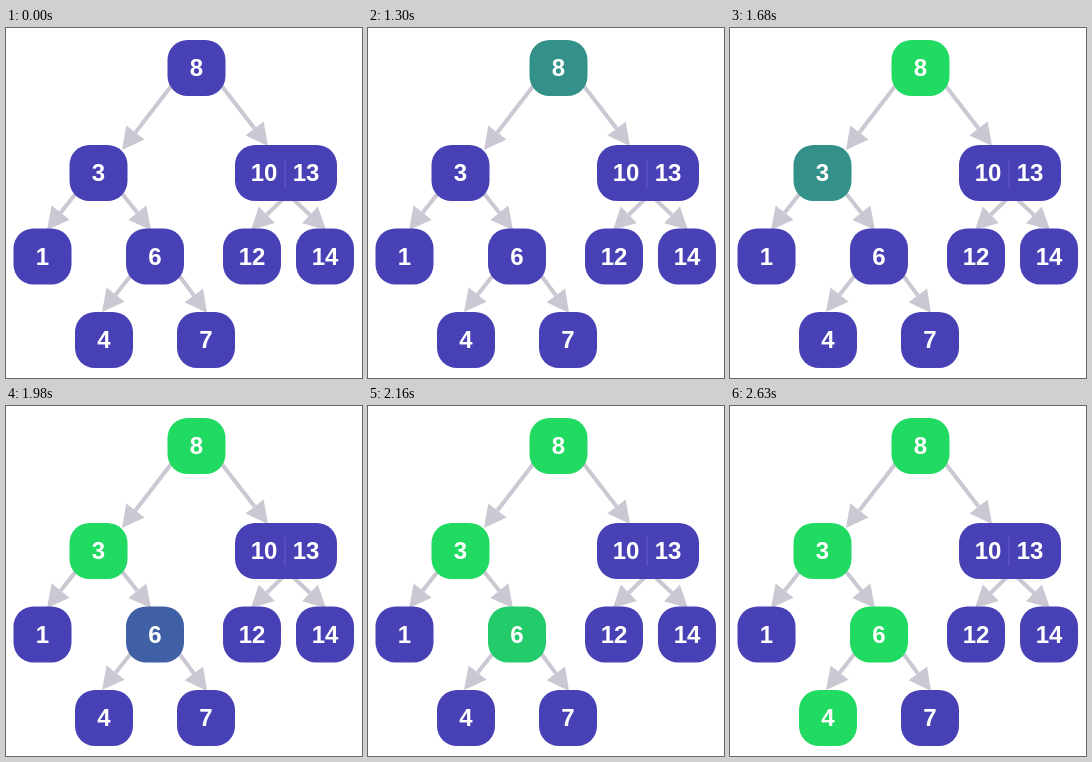
Write an HTML page with a canvas that moves like this. It is 356 px wide and 350 px high and loops after 5690 ms.

```html
<!DOCTYPE html>
<html lang="en">
<head>
<meta charset="utf-8">
<title>Tree search</title>
<style>
html, body { margin: 0; width: 100%; height: 100%; overflow: hidden; background: #fff; }
canvas { display: block; }
</style>
</head>
<body>
<canvas id="stage" width="356" height="350"></canvas>
<script>
const ctx = document.getElementById('stage').getContext('2d');
const LOOP = 5690, FIRST = 1120, STEP = 380, FADE = 350;
const IDLE = [72, 65, 182], FOUND = [32, 218, 98];

// step: place in the search path
const nodes = [
  { label: '8', x: 190.5, y: 40, step: 0 },
  { label: '3', x: 92.5, y: 145, step: 1 },
  { label: '1', x: 36.5, y: 228.5 },
  { label: '6', x: 149, y: 228.5, step: 2 },
  { label: '4', x: 98, y: 312, step: 3 },
  { label: '7', x: 200, y: 312 },
  { label: '12', x: 246, y: 228.5 },
  { label: '14', x: 319, y: 228.5 }
];

const arrows = [
  [166, 57, 116, 122], [215, 57, 262, 118],
  [71, 164, 41, 202], [114, 163, 145, 202],
  [126, 246, 96, 284], [172, 246, 201, 285],
  [277, 171, 245, 202], [287, 171, 320, 202]
];

function arrow([x1, y1, x2, y2]) {
  const len = Math.hypot(x2 - x1, y2 - y1);
  const ux = (x2 - x1) / len, uy = (y2 - y1) / len;
  const bx = x2 - ux * 22, by = y2 - uy * 22;
  ctx.beginPath();
  ctx.moveTo(x1, y1);
  ctx.lineTo(bx, by);
  ctx.stroke();
  ctx.beginPath();
  ctx.moveTo(x2, y2);
  ctx.lineTo(bx - uy * 11.5, by + ux * 11.5);
  ctx.lineTo(bx + uy * 11.5, by - ux * 11.5);
  ctx.fill();
}

function box(x, y, w, color) {
  ctx.fillStyle = color;
  ctx.beginPath();
  ctx.roundRect(x - w / 2, y - 28, w, 56, 20);
  ctx.fill();
}

function label(text, x, y) {
  ctx.fillStyle = '#fff';
  ctx.fillText(text, x, y + 8);
}

function nodeColor(step, t) {
  let p = 0;
  if (step !== undefined) {
    p = Math.min(1, Math.max(0, (t - FIRST - step * STEP) / FADE));
    p = p * p * (3 - 2 * p);
  }
  return `rgb(${IDLE.map((c, i) => Math.round(c + (FOUND[i] - c) * p))})`;
}

function draw(t) {
  ctx.fillStyle = '#fff';
  ctx.fillRect(0, 0, 356, 350);

  ctx.strokeStyle = ctx.fillStyle = '#cbc8d3';
  ctx.lineWidth = 4;
  arrows.forEach(arrow);

  ctx.font = 'bold 24px "Liberation Sans", Arial, sans-serif';
  ctx.textAlign = 'center';
  for (const n of nodes) {
    box(n.x, n.y, 58, nodeColor(n.step, t));
    label(n.label, n.x, n.y);
  }

  box(280, 145, 102, nodeColor(undefined, t));
  ctx.fillStyle = '#655fc3';
  ctx.fillRect(278.5, 131, 1, 29);
  label('10', 258, 145);
  label('13', 300, 145);
}

const start = performance.now();
function tick() {
  draw((performance.now() - start) % LOOP);
  requestAnimationFrame(tick);
}
tick();
</script>
</body>
</html>
```
